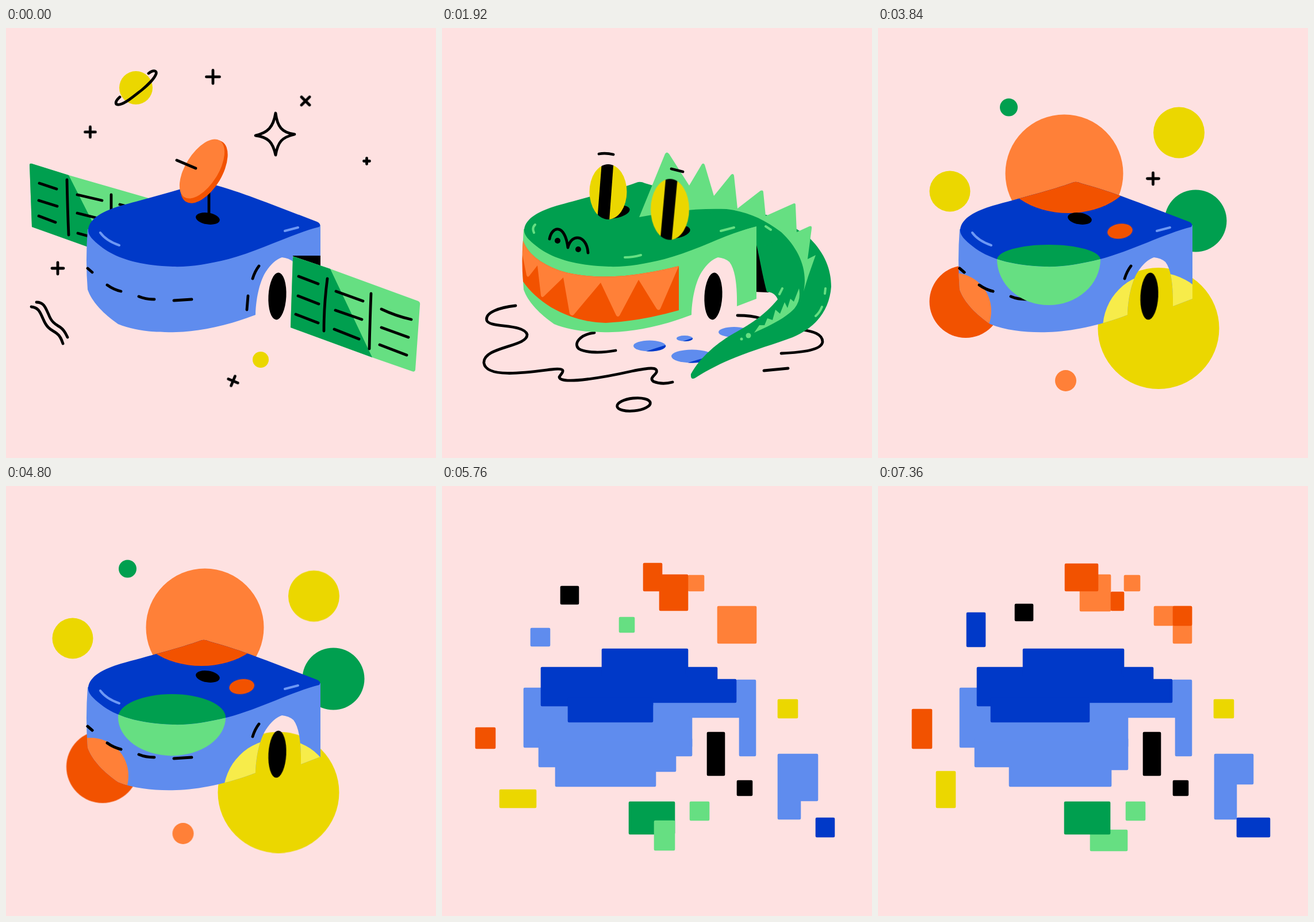
These frames come from a looping animation (748 by 748 pixels, 7680 ms). An HTML page:

```html
<!DOCTYPE html>
<html lang="en">
<head>
<meta charset="utf-8">
<title>Shape shifter</title>
<style>
:root {
  --pink: #fee1e1; --blue: #0039c8; --sky: #5f8cee; --green: #009f4f; --mint: #66df82;
  --orange: #ff8038; --red: #f25200; --yellow: #ebd700; --lemon: #f7ec4a;
}
html, body { margin: 0; width: 100%; height: 100%; overflow: hidden; background: var(--pink); }
svg { display: block; width: 100vw; height: 100vh; }
.blue { fill: var(--blue); } .sky { fill: var(--sky); }
.green { fill: var(--green); } .mint { fill: var(--mint); }
.orange { fill: var(--orange); } .red { fill: var(--red); }
.yellow { fill: var(--yellow); } .lemon { fill: var(--lemon); }
.ink, .shine { fill: none; stroke: #000; stroke-width: 4.8; stroke-linecap: round; stroke-linejoin: round; }
.shine { stroke: #6d98f4; stroke-width: 4; }
.shine.leaf { stroke: var(--mint); }

/* scenes take turns, 1920 ms each */
.scene { animation: turn 7680ms step-end infinite; animation-delay: calc((var(--n) - 4) * 1920ms); }
@keyframes turn { 0% { visibility: visible; } 25%, 100% { visibility: hidden; } }

.drift { animation: drift 1920ms steps(6, end) infinite; }
@keyframes drift { 50% { transform: translate(var(--x, 0px), var(--y, 0px)) scale(var(--sx, 1), var(--sy, 1)); } }
.spin { animation: spin 1920ms steps(12, end) infinite; }
@keyframes spin { to { transform: rotate(90deg); } }
.sway { animation: sway 480ms step-end infinite; }
@keyframes sway { 33.333% { transform: translate(-1px, 2px); } 66.667% { transform: translate(2px, -1px); } }

.star { animation: star 1920ms step-end infinite; }
.burst { animation: burst 1920ms step-end infinite; }
.late { animation-delay: -960ms; }
@keyframes star {
  0% { opacity: 1; transform: none; } 16.667% { opacity: 0; }
  83.333% { opacity: 1; transform: scale(.5); } 91.667%, 100% { opacity: 1; transform: scale(.8); }
}
@keyframes burst { 0% { opacity: 0; } 16.667% { opacity: 1; } 33.333%, 100% { opacity: 0; } }

.eye { animation: blink 1920ms step-end infinite; }
.brow { animation: brow 1920ms step-end infinite; }
@keyframes blink {
  33.333% { transform: scale(1.25, .5); } 41.667% { transform: scale(1.4, .12); } 50% { transform: none; }
}
@keyframes brow {
  33.333% { transform: translateY(-5px); } 41.667% { transform: translateY(-10px); } 50% { transform: none; }
}

.step { animation: step 960ms step-end infinite; }
.second { animation-delay: -640ms; }
.third { animation-delay: -320ms; }
@keyframes step { 0% { opacity: 1; } 33.333%, 100% { opacity: 0; } }
.blocks path { stroke-width: 4.6; stroke-linejoin: round; stroke: #000; }
.blocks .blue { stroke: var(--blue); } .blocks .sky { stroke: var(--sky); }
.blocks .green { stroke: var(--green); } .blocks .mint { stroke: var(--mint); }
.blocks .orange { stroke: var(--orange); } .blocks .red { stroke: var(--red); }
.blocks .yellow { stroke: var(--yellow); }
</style>
</head>
<body>
<svg viewBox="0 0 748 748">
<defs>
  <path id="top" d="M143 350C146 330 170 318 200 309C243 297 305 281 338 269Q345 266 353 270C400 283 425 293 460 306L541 337Q549 341 545 346C500 357 440 388 387 402C350 411 320 416 290 415C230 413 190 400 165 380C150 368 142 360 143 350Z"/>
  <path id="side" d="M142 350Q138 405 142 455C150 478 172 499 195 515C225 527 260 530 296 529C335 528 385 518 434 499C435 465 443 438 452 424Q465 404 480 399Q492 400 500 407Q514 425 513 484L547 471V343L460 320L300 330Z"/>
  <clipPath id="onTop"><use href="#top"/></clipPath>
  <clipPath id="onSide"><path d="M142 350C142 360 150 368 165 380C190 400 230 413 290 415C320 416 350 411 387 402C440 388 500 357 547 344V471L513 484Q514 425 500 407Q492 400 480 399Q465 404 452 424C443 438 435 465 434 499C385 518 335 528 296 529C260 530 225 527 195 515C172 499 150 478 142 455Q138 405 142 350Z"/></clipPath>
  <ellipse id="port" cx="472" cy="466.500" rx="15.500" ry="41" transform="rotate(3 472 466)"/>
  <ellipse id="socket" cx="351" cy="331.500" rx="21" ry="10" transform="rotate(9 351 331)"/>
  <path id="dashes" class="ink" d="M142 418l8 7M176 447q11 8 24 11M231 467q12 5 27 5M292 474l31-2M429 436q4-13 11-22M421 466l-2 24"/>
  <path id="glints" class="shine" d="M164 356Q174 370 197 378M485 353l23-6"/>
  <path id="plus" vector-effect="non-scaling-stroke" d="M-10 0H10M0-10V10"/>
  <path id="ray" d="M-14 0h5M9 0h6M0-14v4M0 9v5"/>
  <g id="drop">
    <ellipse class="sky" rx="1" ry="1"/>
    <path class="blue" d="M1-.15A1 1 0 0 1-.2.98Z"/>
  </g>
  <clipPath id="ballL"><ellipse cy="-48" rx="32.500" ry="48"/></clipPath>
  <clipPath id="ballR"><ellipse cy="-53" rx="33.500" ry="53"/></clipPath>
</defs>

<!-- satellite -->
<g class="scene" style="--n:0">
  <path class="mint" d="M41 238Q41 235 45 236L109 256L255 298L165 388L45 346Z"/>
  <path class="green" d="M41 238Q41 235 45 236L109 256L172 380L165 389L45 346Z"/>
  <path class="ink" d="M58 270l30 10M57 300l32 10M57 327l29 11M106 264q1 50 3 96M124 290l43 10M124 322l36 9M125 357l22 6M183 290v30M198 307l12 3"/>
  <use href="#side" class="sky"/>
  <path d="M499 396H547V420H499Z"/>
  <use href="#top" class="blue"/>
  <use href="#dashes"/><use href="#glints"/>
  <use href="#port"/><use href="#socket"/>
  <path class="ink" d="M353 285V328"/>
  <ellipse class="red" cx="344.500" cy="250" rx="31" ry="61" transform="rotate(31 344.500 250)"/>
  <ellipse class="orange" cx="341" cy="245" rx="28.500" ry="58" transform="rotate(32 341 245)"/>
  <path class="ink" d="M297 230l33 14"/>
  <path class="mint" d="M499 397L564 419L717 475Q721 477 720 482L712 595Q711 599 706 597L637 573L495 521Z"/>
  <path class="green" d="M499 400Q500 396 504 399L564 419L637 573L495 521Z"/>
  <path class="ink" d="M509 432l34 13M508 466l36 14M504 498l39 15M559 436q-6 45-6 91M574 458l47 17M573 491l46 16M571 524l43 17M635 462q-2 50-3 96M653 489q25 12 52 18M653 521l47 17M650 551l47 18"/>
  <circle class="yellow drift" style="--x:2px" cx="226" cy="104" r="29"/>
  <path class="ink" d="M248 79C255 73 263 73 261 80C258 88 246 100 236 108C222 119 208 131 198 133C190 135 188 129 198 120"/>
  <circle class="yellow" cx="443" cy="577" r="14"/>
  <path class="ink sway" d="M44 485C58 486 60 497 65 507C72 524 80 525 88 531C95 536 97 543 99 549M53 477C67 477 69 488 74 498C80 514 88 516 95 521C102 526 104 532 107 538"/>
  <path class="ink" d="M469 148C472 172 480 182 502 185C480 190 473 198 469 221C464 198 456 190 434 187C456 182 465 172 469 148Z"/>
  <g class="ink">
    <g transform="translate(360 85)">
      <g class="star"><use href="#plus" transform="scale(1.150)"/></g>
      <g class="burst"><use href="#ray"/></g>
    </g>
    <g transform="translate(570.500 287.500)">
      <g class="star late"><use href="#plus"/></g>
      <g class="burst late"><use href="#ray"/></g>
    </g>
    <g transform="translate(521 127) rotate(45)"><g class="drift" style="--sx:.3;--sy:.3"><use href="#plus"/></g></g>
    <g transform="translate(146.500 181) scale(.900)"><g class="spin"><use href="#plus"/></g></g>
    <g transform="translate(627.500 231.500) scale(.500)"><g class="drift" style="--sx:2.300;--sy:2.300"><use href="#plus"/></g></g>
    <g transform="translate(90 418)"><g class="drift" style="--sx:1.400;--sy:1.400"><use href="#plus"/></g></g>
    <g transform="translate(395 614) rotate(22.500) scale(.900)"><g class="spin"><use href="#plus"/></g></g>
  </g>
</g>

<!-- crocodile -->
<g class="scene" style="--n:1">
  <path class="ink" d="M128 483C100 486 74 495 78 509C83 522 142 514 148 533C150 555 70 554 73 583C77 610 150 599 190 594C222 590 207 601 204 607C205 622 290 606 330 597C360 591 376 589 373 599C370 605 360 609 368 615C378 619 390 619 401 616M265 530C240 533 228 549 238 558C252 566 280 565 302 561M514 500q25 0 40 5M590 566C630 564 660 560 662 546C662 532 645 528 628 525M560 596l42-4"/>
  <ellipse class="ink" cx="333.500" cy="655" rx="29" ry="11" transform="rotate(-6 333 655)"/>
  <use href="#drop" transform="translate(361 553) scale(28 9.500)"/>
  <use href="#drop" transform="translate(422 540) scale(14 5)"/>
  <use href="#drop" transform="translate(508 529) scale(27 9)"/>
  <use href="#drop" transform="translate(435 571) scale(36 11.500)"/>
  <path d="M540 345H556L568 460L545 459Z"/>
  <path class="green" d="M500 315C550 318 590 327 640 366C666 392 677 420 677 450C674 490 652 520 610 538C560 557 500 570 440 609Q432 613 433 602C450 570 485 543 515 527C545 510 565 495 584 472C580 462 572 459 565 459C555 420 552 395 546 374L500 345Z"/>
  <use href="#side" class="mint"/>
  <use href="#top" class="green"/>
  <path class="green" d="M440 300L510 315L566 330L575 380L546 376V346L500 350Z"/>
  <path class="mint" d="M547 345V390H440V386Q500 357 547 345Z"/>
  <path class="mint" d="M343 329L388 219Q391 214 395 219L430 274L452 237Q455 234 457 238L473 292L503 255Q507 252 508 257L514 314L554 283Q559 281 559 286L563 327L610 306Q615 303 615 308L617 355L639 345Q644 343 643 349L636 402L650 395L637 432L629 458C637 420 620 383 590 355C560 332 530 319 495 315C440 313 390 320 343 329Z"/>
  <path class="mint" d="M543 530L552 517L561 517L566 505L575 508L580 490L588 497L596 477L601 487L606 471L612 476L621 453Q625 473 613 488C597 505 570 518 543 530Z"/>
  <circle class="mint" cx="533" cy="535" r="4.500"/><circle class="mint" cx="521" cy="541" r="2.500"/>
  <path class="shine leaf" d="M592 453l-5 10M667 453l-1 9M661 485q-4 10-11 16M563 345l9 6M162 342q-6 6-2 14M318 399q14 0 28-4M485 353l23-6"/>
  <path class="red" d="M141 370C149 392 170 409 205 422C240 433 280 434 318 431Q365 426 412 414V491Q345 510 285 513C250 512 220 503 190 486Q158 466 141 441Q138 405 141 370Z"/>
  <path class="orange" d="M141 370C149 392 170 409 205 422C240 433 280 434 318 431Q365 426 412 414L380 488Q377 493 373 488L342 438L309 500Q306 504 303 500L276 443L229 499Q225 502 222 497L211 434L177 467Q173 470 172 465L166 413L152 431Q149 435 147 430L140 395Z"/>
  <use href="#port"/>
  <path class="ink" d="M187 367C191 344 214 340 219 382C225 356 252 360 254 391"/>
  <circle cx="201" cy="370" r="5"/><circle cx="237" cy="385" r="5"/>
  <ellipse cx="300" cy="320" rx="27" ry="11" transform="rotate(-10 300 320)"/>
  <ellipse cx="406" cy="355" rx="26" ry="11" transform="rotate(-10 406 355)"/>
  <g transform="translate(289 333)"><g class="eye"><g clip-path="url(#ballL)">
    <path class="yellow" d="M-40-100H40V2H-40Z"/><path d="M-11-100H9.500L2 2H-19Z"/>
  </g></g></g>
  <g transform="translate(396.500 368.500)"><g class="eye"><g clip-path="url(#ballR)">
    <path class="yellow" d="M-40-110H40V2H-40Z"/><path d="M-7-110H13.500L3 2H-17Z"/>
  </g></g></g>
  <path class="ink brow" d="M273 219q12-2 25 1M399 245l20 5"/>
</g>

<!-- bubbles -->
<g class="scene" style="--n:2">
  <circle class="green drift" style="--x:17px" cx="552.500" cy="335.500" r="54"/>
  <circle class="green drift" style="--x:-16px;--y:6px" cx="227.500" cy="138" r="15.500"/>
  <circle class="yellow drift" style="--x:12px;--y:9.500px" cx="523.500" cy="182" r="44.500"/>
  <circle class="yellow drift" style="--x:-9px;--y:-19px" cx="125" cy="284" r="35.500"/>
  <circle class="orange drift" style="--x:-18.500px;--y:-9px" cx="326.500" cy="613.500" r="18.500"/>
  <circle class="orange drift" style="--x:22px;--y:-7px" cx="324" cy="253" r="102.500"/>
  <circle class="red drift" style="--x:15.500px;--y:12.500px" cx="152.500" cy="476" r="63"/>
  <circle class="yellow drift" style="--x:-14px;--y:10.500px" cx="488" cy="522.500" r="105.500"/>
  <use href="#side" class="sky"/>
  <use href="#top" class="blue"/>
  <use href="#dashes"/>
  <g clip-path="url(#onTop)">
    <ellipse class="red drift" style="--x:9px;--y:-9px" cx="331" cy="240" rx="118" ry="82"/>
    <g transform="rotate(-8 421 354)"><ellipse class="red drift" style="--x:-10px;--y:-6px" cx="421" cy="353.500" rx="22" ry="13"/></g>
    <g transform="translate(297 403)"><ellipse class="green drift" style="--x:-8.500px;--sx:1.040;--sy:1.580" rx="90" ry="26"/></g>
  </g>
  <g clip-path="url(#onSide)">
    <g transform="translate(297 402)"><ellipse class="mint drift" style="--x:-8.500px;--sx:1.040;--sy:.840" rx="90" ry="80"/></g>
    <circle class="orange drift" style="--x:16px;--y:12px" cx="131" cy="492" r="66"/>
    <circle class="lemon drift" style="--x:-13px;--y:14px" cx="488" cy="523" r="97"/>
  </g>
  <path class="ink" d="M142 418l8 7M176 447q11 8 24 11"/>
  <use href="#glints"/>
  <use href="#port"/><use href="#socket"/>
  <g class="ink" transform="translate(478.500 262)"><g class="star"><use href="#plus"/></g></g>
</g>

<!-- blocks -->
<g class="scene blocks" style="--n:3">
  <path class="sky" d="M144 353H514V339H544V468H519V401H433V453H144Z"/>
  <path class="blue" d="M174 317H477V338H510V375H365V381H174Z"/>
  <path d="M463 430h27v72h-27zM515 514h23v23h-23z"/>
  <path class="yellow" d="M586 373h31v29h-31z"/>
  <path class="orange" d="M430 157h24v24h-24z"/>
  <path class="mint" d="M433 551h30v29h-30z"/>

  <g class="step">
    <path class="sky" d="M170 440H433V468H405V495H370V521H199V487H170ZM156 249h30v28h-30zM586 468H652V546H622V578H586Z"/>
    <path class="blue" d="M280 285H426V330H280ZM221 370H365V409H221ZM652 579h29v30h-29z"/>
    <path d="M208 176h28v28h-28z"/>
    <path class="mint" d="M310 230h23v23h-23z"/>
    <path class="orange" d="M481 211h64v61h-64z"/>
    <path class="red" d="M352 136H381V156H426V215H380V181H352ZM60 422h31v33h-31z"/>
    <path class="yellow" d="M102 530h60v28h-60z"/>
    <path class="green" d="M327 551H403V604H327Z"/>
    <path class="mint" d="M371 584h32v48h-32z"/>
  </g>

  <g class="step second">
    <path class="sky" d="M170 440H433V468H405V521H199V487H170ZM156 222h30v55h-30zM586 468H652V517H622V578H586Z"/>
    <path class="blue" d="M280 285H426V330H280ZM198 370H365V409H198ZM652 579h29v30h-29z"/>
    <path d="M208 207h28v27h-28z"/>
    <path class="orange" d="M380 156h46v59h-46zM481 211H545V272H515V241H481Z"/>
    <path class="red" d="M352 136h29v45h-29zM60 390h31v32h-31z"/>
    <path class="yellow" d="M102 530h31v28h-31z"/>
    <path class="green" d="M327 551H403V604H327Z"/>
    <path class="mint" d="M371 607h32v25h-32z"/>
  </g>

  <g class="step third">
    <path class="sky" d="M170 440H433V492H404V521H230V487H170ZM587 468H651V517H622V578H587Z"/>
    <path class="blue" d="M254 285H426V330H254ZM198 370H366V409H198ZM156 222h29v56h-29zM626 579h54v30h-54z"/>
    <path d="M240 207h28v26h-28z"/>
    <path class="orange" d="M353 156H403V216H353ZM482 211H544V272H515V241H482Z"/>
    <path class="red" d="M327 137h54v44h-54zM407 186h19v29h-19zM515 211h29v30h-29zM61 390h31v65h-31z"/>
    <path class="yellow" d="M103 498h30v60h-30z"/>
    <path class="mint" d="M371 600h61v33h-61z"/>
    <path class="green" d="M326 551H402V604H326Z"/>
  </g>
</g>
</svg>
</body>
</html>
```
